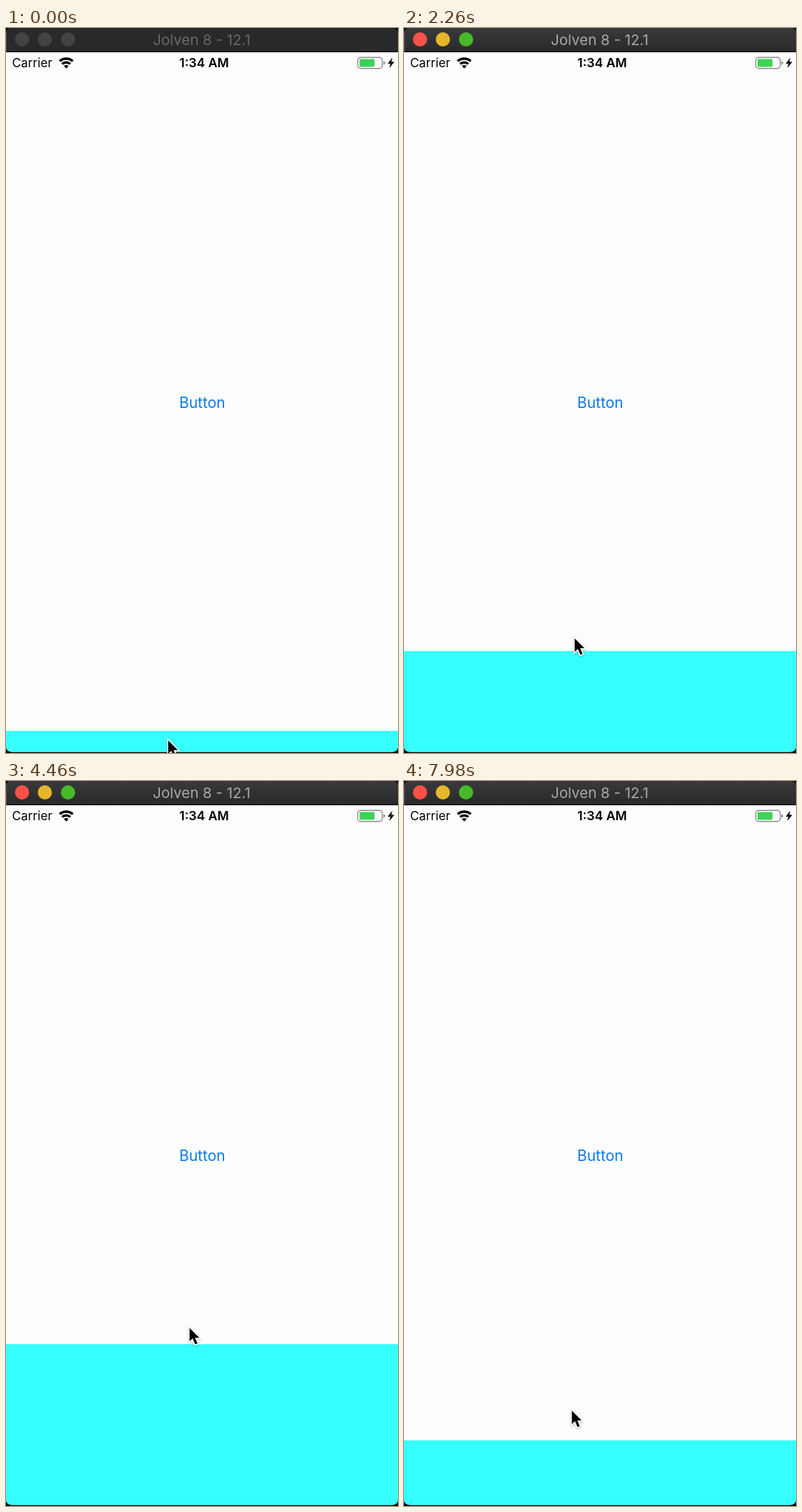
An HTML page that plays this animation: 550 px wide and 1017 px high, repeating every 8000 ms.

```html
<!DOCTYPE html>
<html lang="en">
<head>
<meta charset="utf-8">
<title>Pull-up panel</title>
<style>
  html, body { margin: 0; width: 100%; height: 100%; overflow: hidden; background: #000; }
  svg { display: block; width: 550px; height: 1017px; }
  text { font-family: Inter, Roboto, sans-serif; }
  .lights circle { fill: #434345; }
  .title { fill: #69696b; }
  .bar { fill: #29292b; }
  .active .title { fill: #a8a8aa; }
  .active .bar { fill: url(#barFill); }
  .active .red { fill: #fc5149; }
  .active .yellow { fill: #e4b62c; }
  .active .green { fill: #48b929; }
</style>
</head>
<body>
<svg id="stage" viewBox="0 0 550 1017">
  <defs>
    <linearGradient id="barFill" x2="0" y2="1">
      <stop offset="0" stop-color="#3a3a3c"/>
      <stop offset="1" stop-color="#29292b"/>
    </linearGradient>
    <clipPath id="screen">
      <path d="M0 34H550V1007Q550 1015.5 541.5 1015.5H8.500Q0 1015.5 0 1007Z"/>
    </clipPath>
    <filter id="shadow" x="-50%" y="-50%" width="200%" height="200%">
      <feDropShadow dx="0" dy="1" stdDeviation="1.2" flood-opacity=".35"/>
    </filter>
  </defs>

  <path class="bar" d="M0 33V7Q0 0 7 0H543Q550 0 550 7V33Z"/>
  <path d="M.5 33V7" stroke="#545456"/>
  <g class="lights">
    <circle class="red" cx="22.500" cy="16" r="10"/>
    <circle class="yellow" cx="54.500" cy="16" r="10"/>
    <circle class="green" cx="87" cy="16" r="10"/>
  </g>
  <text class="title" x="274.500" y="24" font-size="20.500" text-anchor="middle">Jolven 8 - 12.1</text>

  <g clip-path="url(#screen)">
    <rect y="34" width="550" height="983" fill="#fdfdfd"/>
    <text x="8.500" y="55" font-size="17.300">Carrier</text>
    <g fill="none" stroke="#000" stroke-width="3.400">
      <path d="M75.300 46.600A13.500 13.500 0 0 1 93.700 46.600"/>
      <path d="M78.800 50.500A8.200 8.200 0 0 1 90.200 50.500"/>
    </g>
    <path d="M84.500 56.700L81.300 53.400A4.500 4.500 0 0 1 87.700 53.400Z"/>
    <text x="278" y="55" font-size="17.600" font-weight="600" text-anchor="middle">1:34 AM</text>
    <rect x="493.500" y="41.200" width="34.500" height="15.600" rx="4.200" fill="none" stroke="#8c8c8c" stroke-width="1.400"/>
    <path d="M529.600 46.300Q532 47 532 49T529.600 51.700Z" fill="#8c8c8c"/>
    <rect x="496" y="43.600" width="21" height="10.800" rx="1.600" fill="#3ed257"/>
    <path d="M542 41.500L535.500 49.900H539.400L537.800 56.200L544.800 47.500H540.700Z"/>
    <text x="275.300" y="532.700" font-size="21" fill="#0a7aea" text-anchor="middle">Button</text>
    <rect id="panel" width="550" height="983" fill="#36ffff"/>
  </g>

  <g id="cursor" filter="url(#shadow)">
    <path d="M1.500 3.200V22.300L5.900 18.100L9.500 26.300L12.700 24.900L9.200 16.900H15.200Z"
      stroke="#fff" stroke-width="3" paint-order="stroke"/>
  </g>
</svg>
<script>
  const LOOP = 8000, ACTIVATE = 760;
  const REST = 986, OPEN = 790;
  const DROP = { start: 4950, length: 300 };

  const linear = p => p;
  const easeIn = p => p * p;
  const easeOut = p => p * (2 - p);
  const easeInOut = p => p * p * (3 - 2 * p);

  // time, x, y, easing towards this point
  const path = [
    [0, 226, 996, linear],
    [1300, 226, 996, linear],
    [1800, 226, 944, easeIn],
    [2260, 238, 853, linear],
    [3100, 256, 764, easeOut],
    [5380, 256, 764, linear],
    [6250, 235, 975, easeInOut],
    [7520, 235, 975, linear],
    [7980, 234, 880, easeIn],
    [LOOP, 234, 873, linear]
  ];

  const stage = document.getElementById('stage');
  const panel = document.getElementById('panel');
  const cursor = document.getElementById('cursor');
  const mix = (a, b, p) => a + (b - a) * p;

  function cursorAt(t) {
    const i = path.findIndex(k => k[0] > t);
    const [t0, x0, y0] = path[i - 1];
    const [t1, x1, y1, ease] = path[i];
    const p = ease((t - t0) / (t1 - t0));
    return [mix(x0, x1, p), mix(y0, y1, p)];
  }

  // The panel follows a drag once the pointer has passed the slack.
  const dragged = (from, y, slack) =>
    Math.max(OPEN, REST - Math.max(0, from - y - slack));

  function panelAt(t, y) {
    if (t < DROP.start) return dragged(996, y, 31);
    if (t < DROP.start + DROP.length)
      return mix(OPEN, REST, easeInOut((t - DROP.start) / DROP.length));
    return t < 7520 ? REST : dragged(975, y, 34);
  }

  function draw(now) {
    const t = now % LOOP;
    const [x, y] = cursorAt(t);
    stage.classList.toggle('active', t >= ACTIVATE);
    cursor.setAttribute('transform', `translate(${Math.round(x)} ${Math.round(y)})`);
    panel.setAttribute('y', Math.round(panelAt(t, y)));
  }

  const begin = performance.now();
  function tick() {
    draw(performance.now() - begin);
    requestAnimationFrame(tick);
  }
  tick();
</script>
</body>
</html>
```
